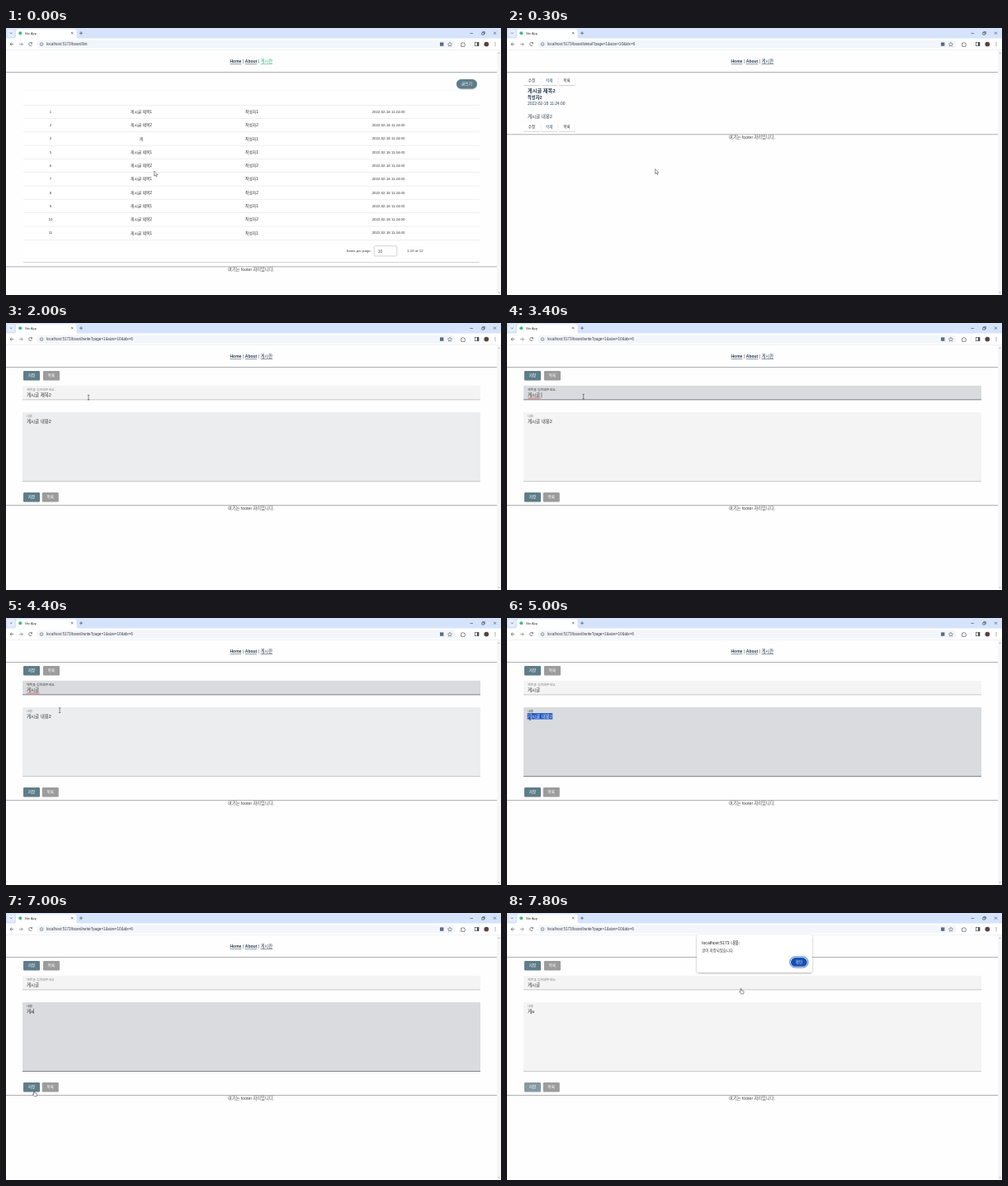
Animation of 600x323 px, one loop 8000 ms. Source, as an HTML page:

```html
<!DOCTYPE html>
<html lang="ko">
<head>
<meta charset="utf-8">
<title>Board</title>
<style>
html, body { margin: 0; width: 100%; height: 100%; overflow: hidden; background: #fefefe; }
svg { display: block; width: 100%; height: 100%; }
text { font-family: "Liberation Sans", "Noto Sans CJK KR", "Noto Sans CJK", sans-serif; white-space: pre; }
.icon { fill: none; stroke: #474b50; stroke-width: .65; }
</style>
</head>
<body>
<svg id="stage" viewBox="0 0 600 323" xmlns="http://www.w3.org/2000/svg"></svg>
<script>
const LOOP = 8000, STEP = 100;
const INK = '#2c3e50', TEAL = '#5f7d89', GRAY = '#9c9c9c';

const attrs = o => Object.entries(o).map(([k, v]) => ` ${k}="${v}"`).join('');
const rect = (x, y, w, h, fill, more = {}) =>
  `<rect${attrs({ x, y, width: w, height: h, fill, ...more })}/>`;
// y is the optical middle of the line
const text = (x, y, size, s, more = {}) =>
  `<text${attrs({ x, y: y + size * .36, 'font-size': size, fill: '#333', ...more })}>${s.replace(/&/g, '&amp;')}</text>`;
const mid = (x, y, size, s, more = {}) => text(x, y, size, s, { 'text-anchor': 'middle', ...more });
const icon = (d, more = {}) => `<path${attrs({ class: 'icon', d, ...more })}/>`;
const dot = (cx, cy, r, fill) => `<circle${attrs({ cx, cy, r, fill })}/>`;
const group = (id, s) => `<g id="${id}">${s}</g>`;
const rule = y => rect(0, y, 595, .7, '#8f8f8f');
const footer = y => rule(y - 4) + mid(297, y, 5.2, '여기는 footer 자리입니다.', { fill: '#444' });

const browser = () =>
  rect(0, 0, 600, 13, '#d5e3fb') +
  rect(1.5, 1.8, 9, 9, '#e6eefc', { rx: 2.5 }) + icon('M4.8 5.5l1.4 1.4 1.4-1.4') +
  `<path d="M9 13q3 0 3-3V4q0-2.5 2.5-2.5H83q2.500 0 2.500 2.500V10q0 3 3 3z" fill="#fff"/>` +
  dot(17.3, 6.3, 2, '#41b883') +
  text(22.7, 6.3, 3.8, 'Vite App') +
  icon('M79 5l2.400 2.400M81.400 5l-2.400 2.400M89 6.200h4M91 4.200v4') +
  icon('M562.500 6.500h3.500M576.800 5.500h2.600v2.600h-2.600zM577.800 5.500v-1h2.600v2.600h-1M591 4.700l3 3M594 4.700l-3 3') +
  rect(0, 12.5, 600, 14, '#fff') + rect(37, 14.8, 508, 9.6, '#f2f5fa', { rx: 4.8 }) +
  rect(0, 26, 600, .5, '#dfe3ea') +
  icon('M9.200 19.600H5M7 17.500l-2.100 2.100L7 21.700') +
  icon('M16 19.600h4.200M18.100 17.500l2.100 2.100-2.100 2.100', { style: 'stroke:#777' }) +
  icon('M31.300 18.400a2 2 0 1 0 .1 2M31.500 17.200v1.500h-1.500') +
  icon('M41.200 19.600a1.900 1.900 0 1 0 3.800 0a1.900 1.900 0 1 0-3.800 0M43.100 19.200v1.500M43.100 18.300v.4', { style: 'stroke-width:.5' }) +
  rect(526, 17.400, 4.400, 4.400, '#5f6c80') +
  icon('M538 17.100l.8 1.700 1.800.2-1.300 1.300.4 1.800-1.700-.9-1.700.9.4-1.800-1.300-1.300 1.800-.2z', { style: 'stroke-width:.5' }) +
  icon('M551.700 18.300h1.300q.8-2 1.600 0h1.400v1.300q1.700.7 0 1.500v1.200h-4.300z') +
  rect(568.600, 17.300, 4.400, 4.400, 'none', { class: 'icon' }) + rect(571, 17.300, 2, 4.400, '#474b50') +
  rect(562.500, 16.500, .4, 6, '#cbd6ea') +
  dot(582.300, 19.600, 2.900, '#5b4340') +
  [17.800, 19.600, 21.400].map(y => dot(593, y, .5, '#474b50')).join('') +
  rect(595, 26.500, 5, 297, '#f6f6f6') +
  `<path d="M596.300 31l1.200-1.600 1.200 1.600zM596.300 319.500l1.200 1.600 1.200-1.600z" fill="#aaa"/>` +
  `<text id="url" x="49" y="21.400" font-size="4.600" fill="#3c4043"></text>`;

const nav = () => {
  const bold = { 'font-weight': 700, 'text-decoration': 'underline', fill: INK };
  return text(271.5, 40.200, 5, 'Home', bold) + text(286.700, 40.200, 5, '|', { fill: INK }) +
    text(289.800, 40.200, 5, 'About', bold) + text(305.400, 40.200, 5, '|', { fill: INK }) +
    `<text id="boardLink" x="308.500" y="42" font-size="5.300" text-decoration="underline">게시판</text>` + rule(53);
};

const listPage = () => {
  const ids = [1, 2, 3, 5, 6, 7, 8, 9, 10, 11], pitch = 16.3;
  const rows = ids.map((id, i) => {
    const y = 101.200 + pitch * i, kind = id === 2 || (id > 5 && id % 2 === 0) ? 2 : 1;
    return rect(21, y - 8.200, 553, .5, '#dedede') +
      mid(54, y, 4.375, `${id}`) + mid(164, y, 4.780, id === 3 ? '게' : `게시글 제목${kind}`) +
      mid(298, y, 4.780, `작성자${kind}`) + mid(463.500, y, 4.320, '2022-02-18 11:24:00');
  }).join('');
  return rect(546, 62, 25, 11.500, TEAL, { rx: 5.700, filter: 'url(#shade)' }) +
    mid(558.500, 67.700, 4.700, '글쓰기', { fill: '#fff' }) +
    rect(21, 75.500, 553, 207.500, '#fff', { rx: 1.200, filter: 'url(#shade)' }) + rows +
    rect(21, 256, 553, .5, '#dedede') +
    text(413, 269.600, 4.300, 'Items per page:') +
    rect(446.300, 263.700, 27.500, 12.200, '#fff', { rx: 1.200, stroke: '#aaa', 'stroke-width': .5 }) +
    text(450.700, 269.700, 5, '10', { fill: '#444' }) + text(486, 269.600, 4.350, '1-10 of 12') +
    footer(292.500);
};

const detailPage = () => {
  const buttons = y => ['수정', '삭제', '목록'].map((s, i) =>
    rect(20 + 21.400 * i, y - 5.500, 20, 11, '#fff', { rx: 1.200, filter: 'url(#shade)', class: i ? '' : 'edit' }) +
    mid(30 + 21.200 * i, y, 4.600, s, { fill: i === 1 ? '#2b5d7d' : '#333' })).join('');
  return buttons(63.500) + buttons(119.200) +
    text(25, 75.500, 6.200, '게시글 제목2', { 'font-weight': 700, fill: INK }) +
    text(25, 84, 5.300, '작성자2', { 'font-weight': 700, fill: INK }) +
    text(25, 91.600, 4.950, '2022-02-18 11:24:00', { fill: INK }) +
    text(25, 107, 5.500, '게시글 내용2', { fill: INK }) + footer(132.500);
};

const field = (id, y, h, label, valueY) => group(id,
  `<path class="fill" d="M20 ${y + h}v${1.200 - h}q0-1.200 1.200-1.200h552.600q1.200 0 1.200 1.200v${h - 1.200}z"/>` +
  rect(20, y + h - .400, 555, .600, '#aaa', { class: 'line' }) +
  text(25, y + 4.500, 3.950, label, { class: 'label' }) +
  rect(24.700, valueY - 3.700, 30.500, 7.400, '#1f57c3', { class: 'selection' }) +
  `<path class="spell" d="M25 ${valueY + 3.800}h15.500" stroke="#e04040" stroke-width=".700"/>` +
  text(25, valueY, 5.500, '', { class: 'value' }) +
  rect(0, valueY - 3.200, .450, 6.400, '#111', { class: 'caret' }));

const writePage = () => {
  const button = (x, y, s, fill, cls = '') =>
    rect(x, y - 5.700, 20, 11.500, fill, { rx: 1.200, class: cls }) + mid(x + 10, y, 4.600, s, { fill: '#fff' });
  return button(21, 63.600, '저장', TEAL) + button(45, 63.600, '목록', GRAY) +
    field('title', 75.700, 17.300, '제목을 입력해주세요.', 87.200) +
    field('body', 108, 83.500, '내용', 118.800) +
    button(21, 210.700, '저장', TEAL, 'save') + button(43.800, 210.700, '목록', GRAY) + footer(224.300);
};

const dialog = () =>
  rect(230, 26, 140, 46, '#fff', { rx: 3, filter: 'url(#lift)' }) +
  text(236.300, 36, 5.200, 'localhost:5173 내용:', { fill: '#222' }) +
  text(236.300, 45.200, 4.400, '글이 저장되었습니다.', { fill: '#333' }) +
  rect(342.700, 52.800, 22.400, 13.200, '#fff', { rx: 6.600, stroke: '#1d55b5', 'stroke-width': .800 }) +
  rect(344, 54.100, 19.800, 10.600, '#1450b4', { rx: 5.300 }) +
  mid(354, 59.400, 4.300, '확인', { fill: '#fff' });

// Pointer shapes share their hot spot at the origin
const pointers = () => group('pointer',
  `<path class="arrow" d="M-.400-3v6l1.400-1.300 1 2.200 1-.4-1-2.100h1.900z" fill="#fff" stroke="#222" stroke-width=".450"/>` +
  `<path class="beam" d="M-1.200-2.700h2.400M-1.200 2.900h2.400M0-2.700v5.600" fill="none" stroke="#222" stroke-width=".500"/>` +
  `<path class="hand" d="M-1-2.800q.600-.700 1.100 0v2l2.400.6q.700.300.6 1l-.5 2.500h-2.900l-2-2.500q.300-.900 1.300 0z" fill="#fff" stroke="#222" stroke-width=".500"/>`);

const stage = document.getElementById('stage');
const shadow = (id, dy, blur, opacity) => `<filter id="${id}" x="-10%" y="-20%" width="120%" height="150%">` +
  `<feDropShadow dx="0" dy="${dy}" stdDeviation="${blur}" flood-opacity="${opacity}"/></filter>`;
stage.innerHTML = `<defs>${shadow('shade', .5, .5, .35)}${shadow('lift', .8, 1.200, .35)}</defs>` +
  rect(0, 0, 600, 323, '#fefefe') + browser() + nav() +
  group('list', listPage()) + group('detail', detailPage()) + group('write', writePage()) +
  group('dialog', dialog()) + pointers();

const $ = s => stage.querySelector(s);
const show = (el, on) => el.setAttribute('visibility', on ? 'visible' : 'hidden');
const toggle = (s, on) => { $(s).style.display = on ? '' : 'none'; };
const between = (t, a, b) => t >= a && t < b;

// Each table holds [start time, value]
const pages = [[0, 'list'], [200, 'detail'], [1500, 'write']];
const urls = {
  list: 'localhost:5173/board/list',
  detail: 'localhost:5173/board/detail?page=1&size=10&idx=6',
  write: 'localhost:5173/board/write?page=1&size=10&idx=6'
};
const titleText = [[0, '게시글 제목2'], [3100, '게시글 제목'], [3200, '게시글 제'], [3300, '게시글 ']];
const bodyText = [[0, '게시글 내용2'], [5300, ''], [5500, 'ㄱ'], [5600, '거'], [5700, '게'], [5800, '게a']];
const titleFill = [[0, '#f4f4f4'], [2100, '#ecedef'], [2400, '#e2e3e6'], [2500, '#dadbdf'], [4500, '#ecedef'], [4600, '#f4f4f4']];
const bodyFill = [[0, '#f4f4f4'], [1700, '#ecedef'], [2100, '#f4f4f4'], [4400, '#ecedef'], [4500, '#e2e3e6'],
  [4600, '#dadbdf'], [7200, '#e9eaec'], [7300, '#f4f4f4']];
const shapes = [[0, 'arrow'], [1000, 'hand'], [1500, 'arrow'], [1700, 'beam'], [6700, 'arrow'], [6800, 'hand']];
const path = [[0, 180, 176], [600, 180, 171], [1100, 42, 65.500], [1400, 38, 65], [1500, 40, 66], [1700, 85, 118],
  [1900, 100, 96], [2000, 100, 90], [2300, 92.700, 89], [4200, 92.700, 89], [4500, 55.500, 119.500],
  [4700, 55.500, 119.500], [5000, 28, 120.500], [5300, 28, 120.500], [5800, 40, 120],
  [6500, 40, 120], [6800, 34.500, 218.500], [7300, 34.500, 218.500], [7800, 284, 94.500]];

const at = (table, t) => table.filter(([start]) => start <= t).pop()[1];
function position(t) {
  const i = path.findIndex(([time]) => time > t);
  if (i < 0) return path[path.length - 1].slice(1);
  const [t0, x0, y0] = path[i - 1], [t1, x1, y1] = path[i];
  const p = (t - t0) / (t1 - t0), e = p * p * (3 - 2 * p);
  return [x0 + (x1 - x0) * e, y0 + (y1 - y0) * e];
}

function drawField(id, { value, fill, focused, caret, selected, spell }) {
  const part = name => $(`#${id} .${name}`);
  const valueEl = part('value');
  valueEl.textContent = value;
  valueEl.setAttribute('fill', selected ? '#fff' : '#333');
  part('fill').setAttribute('fill', fill);
  part('line').setAttribute('fill', focused ? '#3b3d45' : '#aaa');
  part('label').setAttribute('fill', focused ? '#444' : '#888');
  toggle(`#${id} .selection`, selected);
  toggle(`#${id} .spell`, spell);
  toggle(`#${id} .caret`, caret);
  if (caret) part('caret').setAttribute('x', 25 + (value ? valueEl.getComputedTextLength() : 0));
}

function draw(t) {
  const page = at(pages, t);
  for (const id of Object.keys(urls)) toggle('#' + id, id === page);
  $('#url').textContent = urls[page];
  $('#boardLink').setAttribute('fill', page === 'list' ? '#2fb573' : INK);
  $('.edit').setAttribute('fill', between(t, 1000, 1500) ? '#ededed' : '#fff');

  if (page === 'write') {
    drawField('title', {
      value: at(titleText, t), fill: at(titleFill, t), focused: between(t, 2400, 4500),
      caret: between(t, 2400, 3900), selected: false, spell: between(t, 2700, 4500)
    });
    drawField('body', {
      value: at(bodyText, t), fill: at(bodyFill, t), focused: between(t, 4500, 7200),
      caret: between(t, 4500, 4700) || between(t, 5300, 7200), selected: between(t, 4900, 5300), spell: false
    });
    $('.save').setAttribute('fill', t >= 7200 ? '#8499a3' : TEAL);
  }
  toggle('#dialog', t >= 7300);

  const [x, y] = position(t), shape = at(shapes, t);
  $('#pointer').setAttribute('transform', `translate(${x.toFixed(2)} ${y.toFixed(2)})`);
  for (const name of ['arrow', 'beam', 'hand']) show($(`#pointer .${name}`), name === shape);
}

const origin = performance.now();
let last = -1;
function tick() {
  const elapsed = Math.max(0, performance.now() - origin) % LOOP;
  const t = Math.floor(elapsed / STEP) * STEP;
  if (t !== last) draw(last = t);
  requestAnimationFrame(tick);
}
tick();
</script>
</body>
</html>
```
